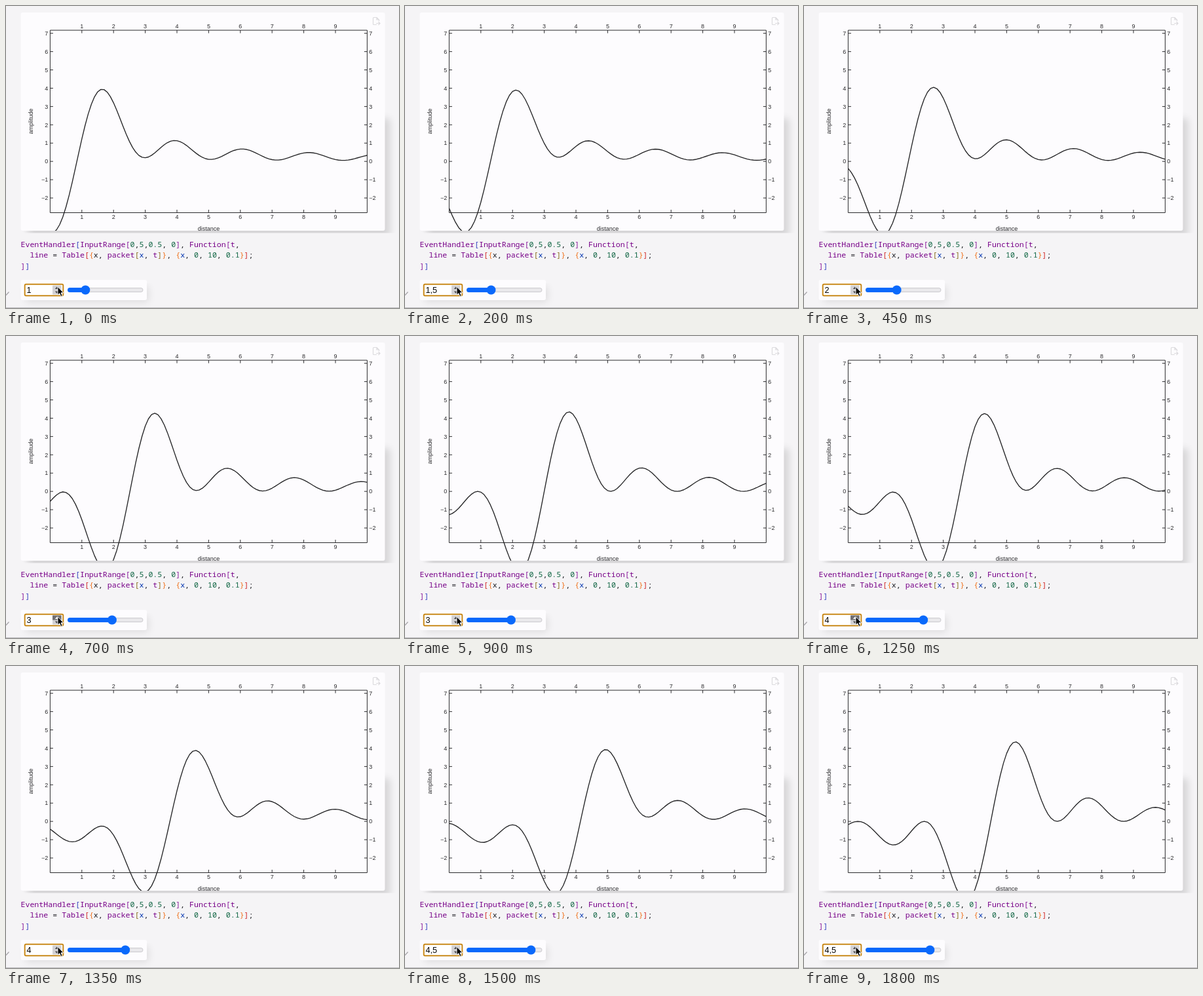
An HTML page for the animation above (1.85 s loop, 600 by 461 pixels).

```html
<!DOCTYPE html>
<html lang="en">
<head>
<meta charset="utf-8">
<title>Wave packet</title>
<style>
html, body { margin: 0; width: 100%; height: 100%; overflow: hidden; background: #f5f4f6; }
svg { display: block; width: 600px; height: 461px; }
.label { font: 9px "Liberation Sans", Arial, sans-serif; fill: #2b2b2d; }
.code { font: 11.6px "Noto Sans Mono", monospace; fill: #1c1c22; white-space: pre; }
.value { font: 12.6px "Liberation Sans", Arial, sans-serif; fill: #000; }
.sym { fill: #708; }
.num { fill: #164; }
.local { fill: #0033b0; }
.b1 { fill: #3340c0; }
.b2 { fill: #8a1a9c; }
.b3 { fill: #d02a2a; }
.b4 { fill: #f0701a; }
.b5 { fill: #8a6d1c; }
</style>
</head>
<body>
<svg viewBox="0 0 600 461">
  <defs>
    <filter id="soft" x="-20%" y="-20%" width="140%" height="150%"><feGaussianBlur stdDeviation="6"/></filter>
    <clipPath id="shadowArea"><rect width="600" height="346.5"/></clipPath>
    <clipPath id="plotArea"><rect x="67" y="10" width="485" height="333"/></clipPath>
  </defs>
  <rect width="600" height="461" fill="#f5f4f6"/>

  <g clip-path="url(#shadowArea)">
    <rect x="34" y="172" width="552" height="182" fill="#000" opacity=".13" filter="url(#soft)"/>
  </g>
  <rect x="22.5" y="10" width="556" height="333" rx="3" fill="#fdfcfe"/>
  <g fill="none" stroke="#dcdbde" stroke-width="1.2">
    <path d="M566 28.5H561.5Q560.5 28.5 560.5 27.5V18.5Q560.5 17.5 561.5 17.5H566L569.5 21V23M566 17.5V21H569.5"/>
    <path d="M565 26.5H571M568.5 24L571 26.5L568.5 29"/>
  </g>

  <g id="axes" stroke="#2b2b2d" fill="none"></g>
  <g id="labels" class="label"></g>
  <path id="curve" clip-path="url(#plotArea)" fill="none" stroke="#252527" stroke-width="1.35" stroke-linejoin="round"/>

  <g class="code">
    <text x="22.5" y="368" xml:space="preserve"><tspan class="sym">EventHandler</tspan><tspan class="b1">[</tspan><tspan class="sym">InputRange</tspan><tspan class="b2">[</tspan><tspan class="num">0</tspan>,<tspan class="num">5</tspan>,<tspan class="num">0.5</tspan>, <tspan class="num">0</tspan><tspan class="b2">]</tspan>, <tspan class="sym">Function</tspan><tspan class="b2">[</tspan><tspan class="sym">t</tspan>,</text>
    <text x="22.5" y="384.3" xml:space="preserve">  <tspan class="sym">line</tspan> = <tspan class="sym">Table</tspan><tspan class="b3">[</tspan><tspan class="b4">{</tspan>x, <tspan class="sym">packet</tspan><tspan class="b5">[</tspan><tspan class="local">x</tspan>, <tspan class="sym">t</tspan><tspan class="b5">]</tspan><tspan class="b4">}</tspan>, <tspan class="b4">{</tspan><tspan class="local">x</tspan>, <tspan class="num">0</tspan>, <tspan class="num">10</tspan>, <tspan class="num">0.1</tspan><tspan class="b4">}</tspan><tspan class="b3">]</tspan>;</text>
    <text x="22.5" y="400.5"><tspan class="b2">]</tspan><tspan class="b1">]</tspan></text>
  </g>

  <rect x="30" y="428" width="188" height="24" fill="#000" opacity=".09" filter="url(#soft)"/>
  <rect x="22.5" y="418" width="192.5" height="31" rx="3" fill="#fdfcfe"/>
  <rect x="28.7" y="424.7" width="58.6" height="17.6" rx="2" fill="#fff" stroke="#c98a1b" stroke-width="2"/>
  <text id="value" class="value" x="31.5" y="438"></text>
  <rect x="71" y="426.5" width="13.5" height="14" rx="1" fill="#d2d1d4"/>
  <rect id="pressed" x="71" y="426.5" width="13.5" height="7" fill="#6f6e72"/>
  <path id="arrowUp" d="M74.8 432L77.6 428.6L80.4 432Z"/>
  <path d="M74.8 435.4L77.6 438.8L80.4 435.4Z" fill="#4c4c4f"/>

  <rect x="94.5" y="430.5" width="114.5" height="6" rx="3" fill="#e9e8eb" stroke="#c2c1c5" stroke-width=".8"/>
  <rect id="fill" x="94" y="430" height="7" rx="3.5" fill="#0a69fb"/>
  <circle id="thumb" cy="433.5" r="7" fill="#0a69fb"/>
  <path d="M79 428.5V441.2L81.8 438.6L83.9 443.4L86.1 442.4L84.1 437.8H87.9Z" fill="#000" stroke="#fff" stroke-width=".9"/>

  <path d="M0 441.5L4.5 436.5" stroke="#a6a5a9" stroke-width="1.3"/>
  <path d="M0 460.5H600" stroke="#bdbcc0"/>
</svg>
<script>
const LOOP = 1850, TICK = 50, MORPH = 200, LEAD = 40;
const STEP = 0.5, FIRST = 1;
// Moment at which the curve starts moving to 1, 1.5, 2, ... 4.5
const starts = [-134, 80, 294, 496, 692, 970, 1240, 1440];

const $ = id => document.getElementById(id);
const px = x => 67.4 + 48.4 * x;
const py = y => 237.2 - 27.93 * y;

function drawAxes() {
  const left = px(0), right = px(10), top = 37, bottom = 315.5;
  let lines = `M${left} ${top}H${right}V${bottom}H${left}Z`;
  let texts = "";
  const label = (x, y, text, anchor = "middle") => {
    texts += `<text x="${x}" y="${y}" text-anchor="${anchor}">${text}</text>`;
  };
  for (let i = 1; i <= 9; i++) {
    lines += `M${px(i)} ${top}v4.5M${px(i)} ${bottom}v-4.5`;
    label(px(i), 34.3, i);
    label(px(i), 325.2, i);
  }
  for (let i = -2; i <= 7; i++) {
    const y = py(i), text = String(i).replace("-", "−");
    lines += `M${left} ${y}h4.5M${right} ${y}h-4.5`;
    label(64.3, y + 3.2, text, "end");
    label(554.3, y + 3.2, text, "start");
  }
  label(309.4, 342.5, "distance");
  texts += '<text transform="translate(41 176) rotate(-90)" text-anchor="middle">amplitude</text>';
  $("axes").innerHTML = `<path d="${lines}"/>`;
  $("labels").innerHTML = texts;
}

// Integral of 2 sin(k u) for k from 0 to 3
function packet(x, t) {
  const u = x - t;
  return Math.abs(u) < 1e-6 ? 0 : 2 * (1 - Math.cos(3 * u)) / u;
}

function lastIndex(time) {
  return starts.filter(start => start <= time).length - 1;
}

function render(time) {
  const index = lastIndex(time);
  const goal = FIRST + STEP * index;
  const mix = Math.min(1, (time - starts[index]) / MORPH);
  const points = Array.from({ length: 101 }, (_, i) => {
    const x = i / 10;
    const y = (1 - mix) * packet(x, goal - STEP) + mix * packet(x, goal);
    return `${px(x).toFixed(2)} ${py(y).toFixed(2)}`;
  });
  $("curve").setAttribute("d", "M" + points.join("L"));

  const clicked = lastIndex(time + LEAD);
  const value = FIRST + STEP * clicked;
  const isPressed = time + LEAD - starts[clicked] < 60;
  const knob = 101 + 20.3 * value;
  $("value").textContent = String(value).replace(".", ",");
  $("pressed").setAttribute("visibility", isPressed ? "visible" : "hidden");
  $("arrowUp").setAttribute("fill", isPressed ? "#f4f4f4" : "#4c4c4f");
  $("fill").setAttribute("width", knob - 94);
  $("thumb").setAttribute("cx", knob);
}

drawAxes();
const begin = performance.now();
function frame() {
  const time = (performance.now() - begin) % LOOP;
  render(Math.floor(time / TICK) * TICK);
  requestAnimationFrame(frame);
}
frame();
</script>
</body>
</html>
```
